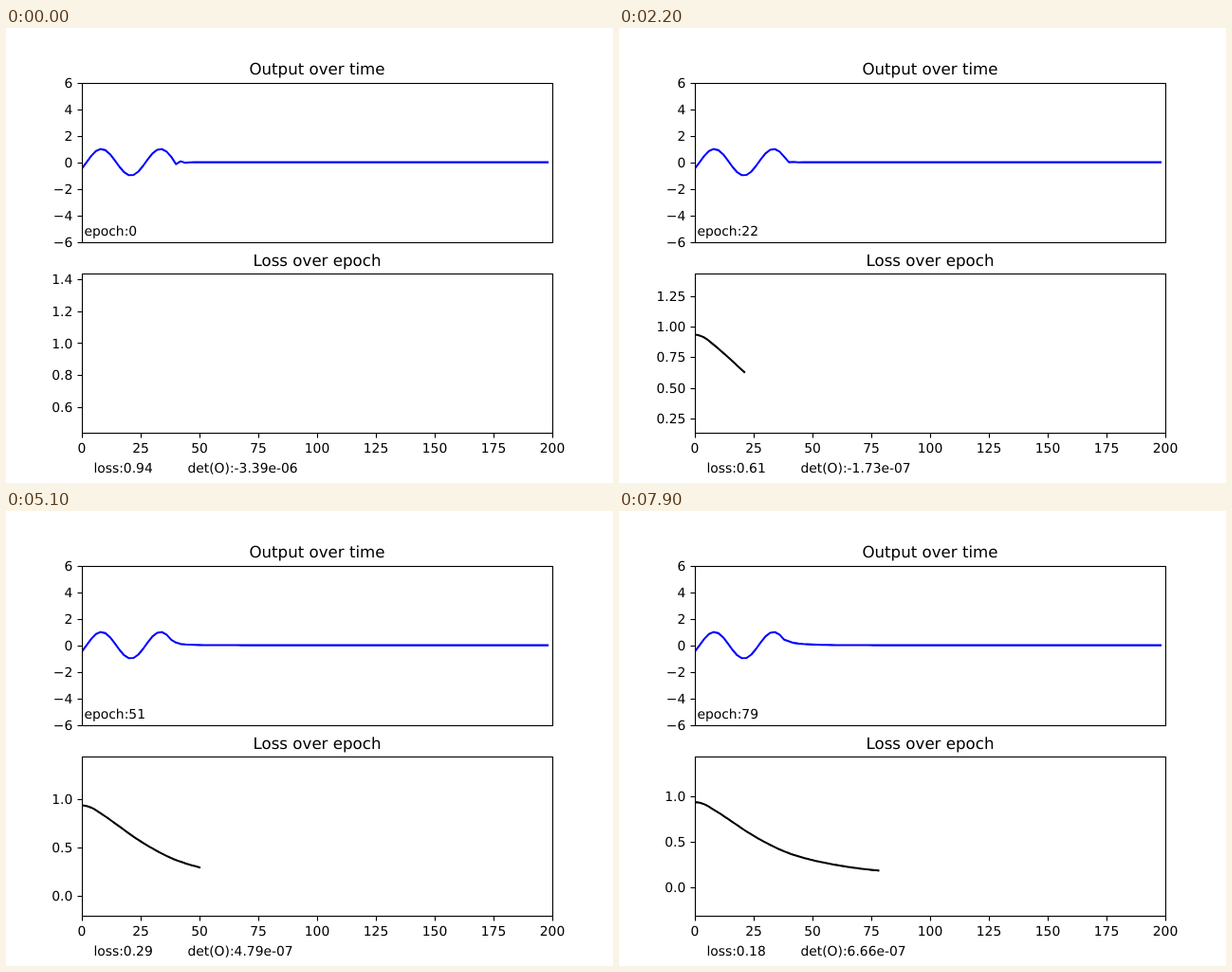
An HTML page for the animation above (8000 ms loop, 640 by 480 pixels).

```html
<!DOCTYPE html>
<html lang="en">
<head>
<meta charset="utf-8">
<title>Training progress</title>
<style>
  html, body { margin: 0; width: 100%; height: 100%; overflow: hidden; background: #fff; }
  svg { display: block; width: 640px; height: 480px; }
  text { font: 13.89px "DejaVu Sans", sans-serif; fill: #000; text-rendering: geometricPrecision; }
  .title { font-size: 16.67px; text-anchor: middle; }
  .mid { text-anchor: middle; }
  .end { text-anchor: end; }
  .axis { fill: none; stroke: #000; stroke-width: 1.11; }
  .curve { fill: none; stroke-width: 2.083; stroke-linejoin: round; stroke-linecap: square; }
</style>
</head>
<body>
<svg viewBox="0 0 640 480">
  <clipPath id="top"><rect x="80" y="57.6" width="496" height="168"/></clipPath>
  <clipPath id="bottom"><rect x="80" y="259.2" width="496" height="168"/></clipPath>
  <path id="output" class="curve" stroke="#00f" clip-path="url(#top)"/>
  <path id="loss" class="curve" stroke="#000" clip-path="url(#bottom)"/>
  <rect class="axis" x="80.5" y="58.5" width="496" height="168"/>
  <rect class="axis" x="80.5" y="259.5" width="496" height="168"/>
  <g id="fixedTicks"></g>
  <g id="lossTicks"></g>
  <text class="title" x="328" y="49">Output over time</text>
  <text class="title" x="328" y="251">Loss over epoch</text>
  <text id="epochText" x="82.4" y="219"></text>
  <text id="lossText" x="92.4" y="469"></text>
  <text id="detText" x="191.4" y="469"></text>
</svg>
<script>
const FRAME = 100, EPOCHS = 80;
const LEFT = 80, HEIGHT = 168, OUT_ZERO = 141.6, LOSS_BASE = 427.2;
const $ = id => document.getElementById(id);
const px = x => LEFT + x * 2.48;

// Smooth cubic curve through the given points.
function spline(xs, ys) {
  const last = xs.length - 1;
  const h = i => xs[i + 1] - xs[i];
  const d = i => (ys[i + 1] - ys[i]) / h(i);
  const m = xs.map((_, i) => i > 0 && i < last
    ? (d(i - 1) * h(i) + d(i) * h(i - 1)) / (h(i - 1) + h(i)) : 0);
  m[0] = 2 * d(0) - m[1];
  m[last] = 2 * d(last - 1) - m[last - 1];
  return x => {
    let i = 0;
    while (i < last - 1 && x > xs[i + 1]) i++;
    const w = h(i), t = (x - xs[i]) / w, u = 1 - t;
    return ys[i] * (1 + 2 * t) * u * u + m[i] * w * t * u * u
      + ys[i + 1] * t * t * (3 - 2 * t) - m[i + 1] * w * t * t * u;
  };
}

const lossAt = spline(
  [0, 4, 8, 15, 21, 30, 38, 50, 60, 69, 78],
  [.936, .912, .853, .735, .629, .492, .393, .297, .244, .208, .182]);
const detAt = spline(
  [0, 9, 22, 27, 39, 51, 70, 79],
  [-33.9, -19.9, -1.73, .9, 3.47, 4.79, 6.1, 6.66]);

// The prediction after the seed: three leading values, then a decay.
const keys = [0, 9, 22, 39, 51, 70, 79];
const lead = [
  spline(keys, [-.14, -.11, 0, .13, .2, .27, .29]),
  spline(keys, [.07, .05, .03, .05, .09, .155, .175]),
  spline(keys, [-.04, -.035, -.01, .03, .055, .105, .125])
];
const decayAt = spline(keys, [.3, .3, .4, .6, .7, .73, .74]);

function outputAt(step, n) {
  if (step < 20) return Math.sin(step / 2 - .5);
  const k = step - 20;
  return k < 3 ? lead[k](n) : lead[2](n) * decayAt(n) ** (k - 2);
}

const polyline = (count, point) => count
  ? "M" + Array.from({ length: count }, (_, i) => point(i).map(v => v.toFixed(2)).join()).join("L")
  : "";

function yTick(y, label) {
  const row = Math.floor(y + .5) + .5;
  return `<path class="axis" d="M75.5 ${row}H80.5"/>`
    + `<text class="end" x="70.3" y="${Math.round(y + 5.1)}">${label}</text>`;
}

function xTick(value) {
  const x = px(value);
  return `<path class="axis" d="M${x + .5} 427.5V432.5"/>`
    + `<text class="mid" x="${x}" y="448">${value}</text>`;
}

function drawFixedTicks() {
  let out = "";
  for (let v = -6; v <= 6; v += 2) out += yTick(OUT_ZERO - v * 14, String(v).replace("-", "\u2212"));
  for (let v = 0; v <= 200; v += 25) out += xTick(v);
  $("fixedTicks").innerHTML = out;
}

function scientific(v) {
  return v.toExponential(2).replace(/e-(\d)$/, "e-0$1");
}

function draw(n) {
  const low = lossAt(Math.max(n - 1, 0)) - .5;
  const range = lossAt(0) + .5 - low;
  const lossY = v => LOSS_BASE - (v - low) / range * HEIGHT;

  const step = [.2, .25, .5].find(s => s >= range / 6 - 1e-9);
  let ticks = "";
  for (let i = Math.ceil(low / step); i * step <= low + range; i++)
    ticks += yTick(lossY(i * step), (i * step).toFixed(step === .25 ? 2 : 1));
  $("lossTicks").innerHTML = ticks;

  $("output").setAttribute("d", polyline(100, i => [px(2 * i), OUT_ZERO - 14 * outputAt(i, n)]));
  $("loss").setAttribute("d", polyline(n > 1 ? n : 0, i => [px(i), lossY(lossAt(i))]));
  $("epochText").textContent = "epoch:" + n;
  $("lossText").textContent = "loss:" + lossAt(n).toFixed(2);
  $("detText").textContent = "det(O):" + scientific(detAt(n) * 1e-7);
}

let shown = -1;
function tick() {
  const n = Math.floor(performance.now() / FRAME) % EPOCHS;
  if (n !== shown) draw(shown = n);
  requestAnimationFrame(tick);
}

drawFixedTicks();
tick();
</script>
</body>
</html>
```
